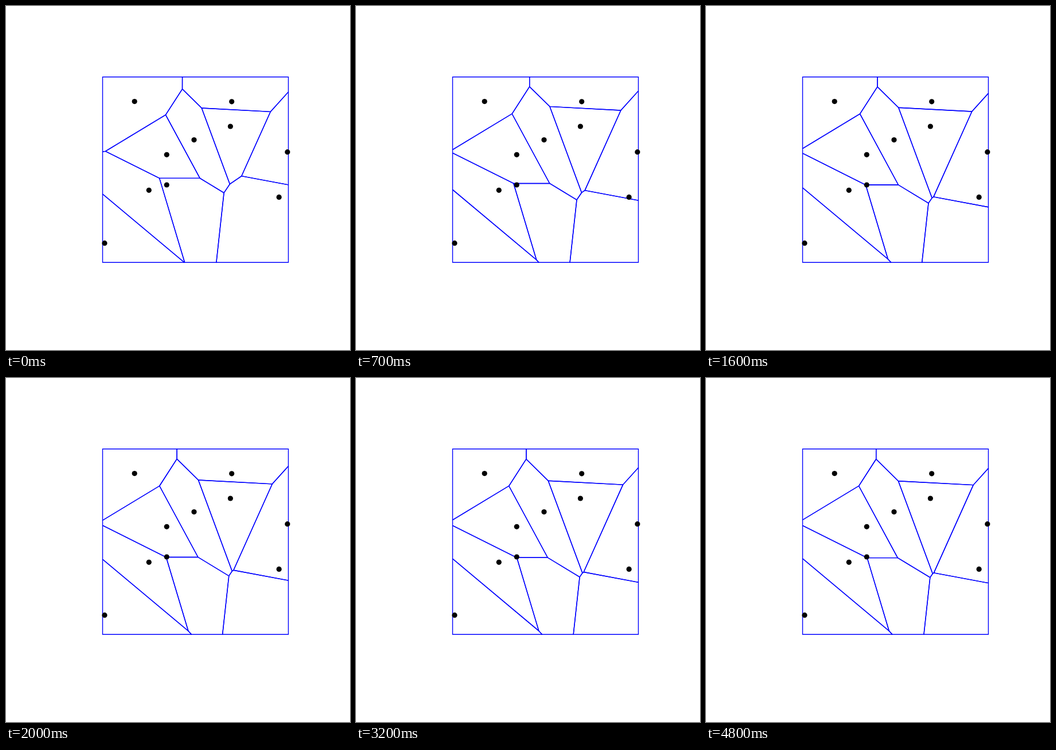
Animation of 600x600 px, one loop 4900 ms. Source, as an HTML page with a canvas:

```html
<!DOCTYPE html>
<html lang="en">
<head>
<meta charset="utf-8">
<title>Power diagram with cells growing to equal area</title>
<style>
  html, body { margin: 0; width: 100%; height: 100%; overflow: hidden; background: #fff; }
  canvas { display: block; width: 600px; height: 600px; }
</style>
</head>
<body>
<canvas id="stage" width="600" height="600"></canvas>
<script>
const STEP_MS = 100, STEPS = 49;
const FIRST_RATE = 0.2, RATE = 0.1;
const LEFT = 168.5, TOP = 123.8, RIGHT = 492.5, BOTTOM = 447.2;
const SITES = [
  [224.2, 166.5], [393.7, 166.8], [391.4, 210], [328, 233.5], [280.3, 259.3],
  [249.3, 321.3], [280.3, 312], [172, 413.7], [476.2, 333.4], [490.9, 254.7]
];
const SHARE = (RIGHT - LEFT) * (BOTTOM - TOP) / SITES.length;

// Keep the part of a polygon where a*x + b*y <= c.
function clip(poly, a, b, c) {
  const out = [];
  poly.forEach((p, i) => {
    const q = poly[(i + 1) % poly.length];
    const dp = a * p[0] + b * p[1] - c;
    const dq = a * q[0] + b * q[1] - c;
    if (dp <= 0) out.push(p);
    if (dp * dq < 0) {
      const k = dp / (dp - dq);
      out.push([p[0] + k * (q[0] - p[0]), p[1] + k * (q[1] - p[1])]);
    }
  });
  return out;
}

function powerCells(weights) {
  const lift = SITES.map(([x, y], i) => x * x + y * y - weights[i]);
  return SITES.map(([x, y], i) => {
    let cell = [[LEFT, TOP], [RIGHT, TOP], [RIGHT, BOTTOM], [LEFT, BOTTOM]];
    SITES.forEach(([u, v], j) => {
      if (j !== i) cell = clip(cell, 2 * (u - x), 2 * (v - y), lift[j] - lift[i]);
    });
    return cell;
  });
}

function area(poly) {
  return Math.abs(poly.reduce((sum, p, i) => {
    const q = poly[(i + 1) % poly.length];
    return sum + p[0] * q[1] - p[1] * q[0];
  }, 0)) / 2;
}

// Gradient steps: small cells gain weight, large ones lose it.
function buildStates() {
  const states = [];
  let weights = SITES.map(() => 0);
  let cells = powerCells(weights);
  for (let n = 0; n < STEPS; n++) {
    const rate = n ? RATE : FIRST_RATE;
    weights = weights.map((w, i) => w + rate * (SHARE - area(cells[i])));
    cells = powerCells(weights);
    states.push(cells);
  }
  return states;
}

const states = buildStates();
const ctx = document.getElementById("stage").getContext("2d");
let shown = -1;

function draw(cells) {
  ctx.fillStyle = "#fff";
  ctx.fillRect(0, 0, 600, 600);
  ctx.strokeStyle = "#00f";
  ctx.lineWidth = 1.4;
  ctx.lineJoin = "round";
  for (const cell of cells) {
    ctx.beginPath();
    cell.forEach(([x, y]) => ctx.lineTo(x, y));
    ctx.closePath();
    ctx.stroke();
  }
  ctx.fillStyle = "#000";
  for (const [x, y] of SITES) {
    ctx.beginPath();
    ctx.arc(x, y, 4.6, 0, 2 * Math.PI);
    ctx.fill();
  }
}

let start = null;
function tick(now) {
  if (start === null) start = now;
  const n = Math.floor(Math.max(0, now - start) / STEP_MS) % STEPS;
  if (n !== shown) draw(states[shown = n]);
  requestAnimationFrame(tick);
}
draw(states[0]);
requestAnimationFrame(tick);
</script>
</body>
</html>
```
